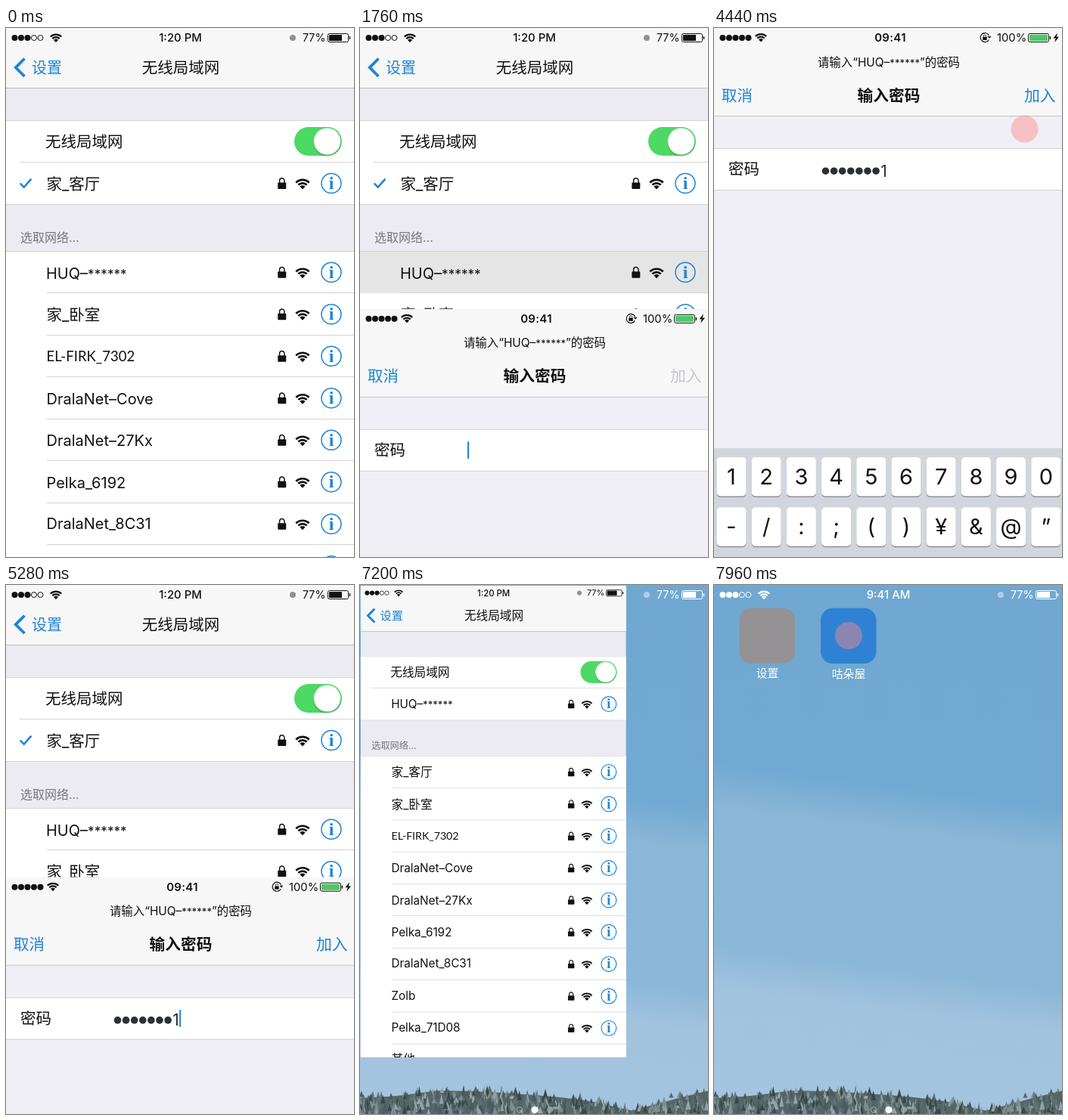
An HTML page for the animation above (8 s loop, 460 by 700 pixels).

```html
<!DOCTYPE html>
<html lang="zh-CN">
<head>
<meta charset="utf-8">
<title>Wi-Fi</title>
<style>
  html, body { margin: 0; width: 100%; height: 100%; overflow: hidden; background: #70a9d2; }
  #stage { display: block; width: 460px; height: 700px; }
  text { font-family: Inter, "Noto Sans CJK SC", "Noto Sans CJK", sans-serif; white-space: pre; }
  .lato { font-family: Lato, sans-serif; }
  .info { font-family: "Liberation Serif", "Noto Serif", serif; }
</style>
</head>
<body>
<svg id="stage" viewBox="0 0 460 700" xmlns="http://www.w3.org/2000/svg"></svg>
<script>
const BLUE = '#1c84d8', INK = '#111', LINE = '#d3d3d8';
const LOOP = 8000;
const NETWORK = 'HUQ–<tspan font-size="0.86em">******</tspan>';

// ---- drawing helpers ----
const rect = (x, y, w, h, fill, extra = '') =>
  `<rect x="${x}" y="${y}" width="${w}" height="${h}" fill="${fill}" ${extra}/>`;
const circle = (x, y, r, fill, extra = '') =>
  `<circle cx="${x}" cy="${y}" r="${r}" fill="${fill}" ${extra}/>`;
const text = (x, y, size, str, fill = INK, extra = '') =>
  `<text x="${x}" y="${y}" font-size="${size}" fill="${fill}" ${extra}>${str}</text>`;
const stroke = (d, color, w, extra = '') =>
  `<path d="${d}" fill="none" stroke="${color}" stroke-width="${w}" ${extra}/>`;
const at = (x, y, body, scale = 1) =>
  `<g transform="translate(${x} ${y}) scale(${scale})">${body}</g>`;
const hline = (x, y, color = LINE) => rect(x, y, 460 - x, 1, color);
const MID = 'text-anchor="middle"';

function wifi(x, y, color, scale = 1) {
  const arc = r => `M${-r * 0.69} ${-r * 0.72}A${r} ${r} 0 0 1 ${r * 0.69} ${-r * 0.72}`;
  return at(x, y, stroke(arc(12.6) + arc(8.2), color, 2.7) +
    `<path d="${arc(5.2)}L0 0Z" fill="${color}"/>`, scale);
}

function lock(x, y, color, scale = 1) {
  return at(x, y, rect(-5.5, -1.5, 11, 8.5, color, 'rx="1"') +
    stroke('M-3.2 -1V-4a3.2 3.2 0 0 1 6.4 0V-1', color, 1.5), scale);
}

function signal(color, filled) {
  let s = '';
  for (let i = 0; i < 5; i++) {
    s += i < filled ? circle(11.5 + 8.5 * i, 13, 4, color)
      : circle(11.5 + 8.5 * i, 13, 3.5, 'none', `stroke="${color}" stroke-width="1"`);
  }
  return s;
}

function battery(x, color, level, fill) {
  return rect(x + 0.5, 7.5, 27, 11, 'none', `rx="2" stroke="${color}"`) +
    rect(x + 2, 9, level, 8, fill, 'rx="0.5"') + rect(x + 28.7, 11, 1.5, 4, color, 'rx="0.7"');
}

function statusBar(color, clock) {
  return signal(color, 3) + wifi(66, 19, color, 0.83) +
    text(230.5, 18.2, 14.9, clock, color, MID + ' font-weight="500"') +
    circle(379, 13, 4, color, 'opacity="0.45"') +
    text(392, 18, 14.3, '77%', color) + battery(425, color, 17, color);
}

const info = y => circle(430, y, 13, 'none', `stroke="${BLUE}" stroke-width="1.5"`) +
  text(430, y + 7.5, 24, 'i', BLUE, MID + ' class="info" font-weight="bold"');
const rowIcons = y => lock(364.8, y, INK) + wifi(392, y + 7.5, INK) + info(y - 0.5);
const check = (x, extra) => stroke(`M${x - 7.3} 205.5l5 5.2l9.8 -11`, BLUE, 2.5, extra);

// ---- network list, 460 x 818 ----
function listPage() {
  const names = [
    ['家_卧室', 387, 20.5], ['EL-FIRK_7302', 441, 18.5, 'class="lato"'],
    ['DralaNet–Cove', 497.5, 20], ['DralaNet–27Kx', 553, 20], ['Pelka_6192', 608.5, 20],
    ['DralaNet_8C31', 662.5, 20], ['Zolb', 718, 20], ['Pelka_71D08', 773.5, 20]
  ];
  let s = rect(0, 0, 460, 818, '#ebebf1') + rect(0, 0, 460, 79, '#f7f7f7') + hline(0, 79, '#b9b9bc') +
    statusBar(INK, '1:20 PM') + stroke('M24.5 40.5L12.8 52.3L24.5 64', BLUE, 3.8) +
    text(34, 59.5, 20, '设置', BLUE) + text(231, 59.5, 20.5, '无线局域网', INK, MID) +
    rect(0, 122, 460, 112, '#fff') + hline(0, 122) + hline(18, 177) + hline(0, 233) +
    text(52, 158, 20.5, '无线局域网') +
    rect(381, 131, 63, 38, '#4cd964', 'rx="19"') +
    circle(424.5, 152.5, 18, '#000', 'opacity="0.13"') + circle(424.5, 150, 17.6, '#fff') +
    rowIcons(206) + text(19, 283, 16, '选取网络...', '#77777c') +
    rect(0, 295, 460, 523, '#fff') + rect(0, 296, 460, 55, '#e5e5e5', 'id="press" opacity="0"') + hline(0, 295);
  for (let i = 0; i < 9; i++) {
    s += hline(54, Math.floor(350.5 + 55.5 * i)) + rowIcons(323.8 + 55.5 * i);
  }
  for (const [name, y, size, extra] of names) s += text(53.5, y, size, name, INK, extra);
  s += text(53.5, 829, 20.5, '其他');
  s += `<g id="before">${check(26)}${text(53.5, 214, 20.5, '家_客厅')}${text(53, 332, 20, NETWORK)}</g>`;
  s += `<g id="after">${check(30.7, 'id="tick"')}${text(53, 213, 20, NETWORK)}${text(53.5, 330, 20.5, '家_客厅')}</g>`;
  return `<g id="list"><svg width="460" height="818" overflow="hidden">${s}</svg></g>`;
}

// ---- password sheet ----
function sheet() {
  let s = rect(0, 0, 460, 818, '#efeff5') + rect(0, 0, 460, 116, '#f7f7f8') + hline(0, 116, '#c4c4c8') +
    signal(INK, 5) + wifi(62, 18.5, INK, 0.83) +
    text(233, 18, 15, '09:41', INK, MID + ' font-weight="600" letter-spacing="0.3"') +
    stroke('M363.6 10A6 6 0 1 0 363.4 15.5', INK, 1.2) + '<path d="M361.5 11h5l-2.5 3z" fill="#111"/>' +
    lock(358, 12.5, INK, 0.5) + text(374, 18, 14.8, '100%') +
    battery(415, INK, 24, '#4cc964') + '<path d="M454 6.5l-5.5 7h3.2l-1.5 5.5l5.8 -7.3h-3.2z" fill="#111"/>' +
    text(231, 50.5, 15.4, `请输入“${NETWORK}”的密码`, INK, MID) +
    text(10, 96.5, 20.5, '取消', BLUE) +
    text(231, 96.5, 20.7, '输入密码', INK, MID + ' font-weight="600"') +
    text(410, 96.5, 20.8, '加入', '#c8c8cc', 'id="join"') +
    rect(0, 159, 460, 55, '#fff') + hline(0, 159) + hline(0, 214) +
    text(19, 194, 20.5, '密码');
  for (let i = 0; i < 7; i++) s += circle(147.5 + 11.1 * i, 189.2, 4.8, '#2b3036', 'class="bullet"');
  s += text(0, 196.5, 21, '1', '#2b3036', 'id="last"') + rect(0, 175.5, 2, 22.5, BLUE, 'id="caret"');
  s += rect(0, 556, 460, 262, '#d1d5dc');
  ['1234567890', '-/:;()¥&@”'].forEach((keys, row) => [...keys].forEach((k, i) => {
    const x = 3.5 + 46.2 * i, y = 568 + 66.3 * row;
    s += rect(x, y + 1.5, 39, 51.5, '#8d9095', 'rx="5"') + rect(x, y, 39, 51.5, '#fff', 'rx="5"') +
      text(x + 19.5, y + 36, 29, k === '&' ? '&amp;' : k, INK, MID);
  }));
  return `<g id="sheet">${s}</g>`;
}

// ---- home screen ----
function forest() {
  let seed = 7;
  const rnd = () => (seed = (seed * 16807) % 2147483647) / 2147483647;
  const top = [670, 667, 660, 661, 664, 668, 674, 687, 673, 660];
  const tones = ['#5f7274', '#4a5c5f', '#7d8e92', '#37474a', '#95a3a6', '#586460'];
  const ridge = x => {
    const u = Math.min(8.99, Math.max(0, x / 51.2)), i = Math.floor(u);
    return top[i] + (top[i + 1] - top[i]) * (u - i);
  };
  let s = '<path fill="#54676a" d="M0 700V680';
  for (let x = 0; x <= 460; x += 20) s += `L${x} ${Math.min(697, ridge(x) + 9)}`;
  s += 'V700Z"/>';
  const count = 600;
  for (let i = 0; i < count; i++) {
    const x = rnd() * 460, y = ridge(x) - 3 + rnd() * 8 + 30 * i / count;
    const w = 1.8 + rnd() * 2.6, h = 7 + rnd() * 9;
    s += `<path fill="${tones[Math.floor(rnd() * tones.length)]}" d="M${x.toFixed(1)} ${y.toFixed(1)}l${w.toFixed(1)} ${h.toFixed(1)}h${(-2 * w).toFixed(1)}z"/>`;
  }
  return s;
}

function home() {
  const stops = [[0, '#70a8d1'], [0.33, '#71a9d2'], [0.41, '#8ab6d7'], [0.67, '#8bb7d8'], [0.75, '#a2c3de'], [1, '#a4c4df']];
  return '<defs><linearGradient id="sky" gradientUnits="userSpaceOnUse" x1="0" y1="0" x2="-90" y2="700">' +
    stops.map(([o, c]) => `<stop offset="${o}" stop-color="${c}"/>`).join('') + '</linearGradient></defs>' +
    rect(0, 0, 460, 700, 'url(#sky)') + forest() + statusBar('#fff', '9:41 AM') +
    circle(211, 694.5, 3.7, 'none', 'stroke="#fff" stroke-opacity="0.5"') + circle(231, 694.5, 4.5, '#fff') +
    circle(251, 694.5, 4.2, '#fff', 'opacity="0.4"') +
    rect(33.5, 30.5, 73.5, 73.5, '#949294', 'rx="16"') + rect(141, 30.5, 73.5, 73.5, '#2f82d3', 'rx="16"') +
    text(70.5, 122, 14.8, '设置', '#fff', MID) + text(178, 122.5, 14.8, '咕朵屋', '#fff', MID);
}

const touch = `<g id="touch">${circle(0, 0, 18, '#ff8888', 'id="halo" opacity="0.45"')}` +
  `${circle(0, 0, 8.5, '#d04a52', 'id="core"')}</g>`;

const stage = document.getElementById('stage');
stage.innerHTML = home() + listPage() + sheet() + touch;

// ---- motion ----
const el = {};
for (const id of ['list', 'press', 'before', 'after', 'tick', 'sheet', 'join', 'last', 'caret', 'touch', 'halo', 'core']) {
  el[id] = document.getElementById(id);
}
const bullets = [...document.querySelectorAll('.bullet')];
const set = (node, attrs) => { for (const k in attrs) node.setAttribute(k, attrs[k]); };

const part = (t, a, b) => Math.min(1, Math.max(0, (t - a) / (b - a)));
const smooth = u => u * u * (3 - 2 * u);
const smoother = u => u * u * u * (u * (6 * u - 15) + 10);
const out = u => 1 - (1 - u) * (1 - u);
const mix = (a, b, u) => a + (b - a) * u;

const KEY_START = 2480, KEY_STEP = 180, CHARS = 8;
const presses = [1200, ...Array.from({ length: CHARS }, (_, i) => KEY_START + KEY_STEP * i), 4640];

// start, end of visibility; start, end of travel; from, to
const trips = [
  [240, 1480, 400, 1040, [300, 540], [230, 323]],
  [2280, 4880, 3920, 4560, [22, 589], [430, 88]],
  [7740, 8200, 7740, 8200, [178, 67], [178, 67]]
];

function drawTouch(t) {
  const trip = trips.find(p => t >= p[0] && t < p[1]);
  if (!trip) return set(el.touch, { opacity: 0 });
  const [a, b, c, d, from, to] = trip, u = part(t, c, d);
  const x = mix(from[0], to[0], smoother(u)), y = mix(from[1], to[1], smooth(u));
  let push = 0;
  for (const p of presses) push = Math.max(push, 1 - Math.abs(t - p) / 90);
  set(el.touch, {
    transform: `translate(${x} ${y})`,
    opacity: Math.min(part(t, a, a + 140), 1 - part(t, b - 160, b))
  });
  set(el.halo, { r: 18 + 1.2 * push });
  set(el.core, { opacity: 0.45 * push });
}

function drawSheet(t) {
  const y = t < 4000 ? 700 * (1 - out(part(t, 1620, 2140))) : 700 * smooth(part(t, 4960, 5560));
  set(el.sheet, { transform: `translate(0 ${y})`, visibility: y >= 700 ? 'hidden' : 'visible' });
  const n = Math.min(CHARS, Math.max(0, Math.floor((t - KEY_START) / KEY_STEP) + 1));
  bullets.forEach((b, i) => set(b, { opacity: i < n - 1 ? 1 : 0 }));
  const x = 142 + 11.1 * Math.max(0, n - 1);
  set(el.last, { x: x + 0.5, opacity: n ? 1 : 0 });
  const on = t < 3860 || Math.floor((t - 3860) / 500) % 2 === 0;
  set(el.caret, { x: n ? x + 9.5 : 142, opacity: on ? 1 : 0 });
  set(el.join, { fill: n === CHARS ? BLUE : '#c8c8cc' });
}

function drawList(t) {
  const swap = smooth(part(t, 5800, 6360));
  set(el.before, { opacity: 1 - swap });
  set(el.after, { opacity: swap });
  set(el.tick, { opacity: t < 6720 ? 1 : 0 });
  set(el.press, { opacity: t >= 1200 && t < 2400 ? 1 : 0 });
  // shrink into the first home icon
  const q = smooth(part(t, 6920, 7720)), q3 = q * q * q;
  set(el.list, {
    transform: `translate(${30 * q3} ${30 * q3}) scale(${mix(1, 0.165, q)})`,
    opacity: 1 - q3 * q3
  });
}

function frame(now) {
  const t = now % LOOP;
  drawList(t);
  drawSheet(t);
  drawTouch(t);
  requestAnimationFrame(frame);
}
frame(0);
</script>
</body>
</html>
```
